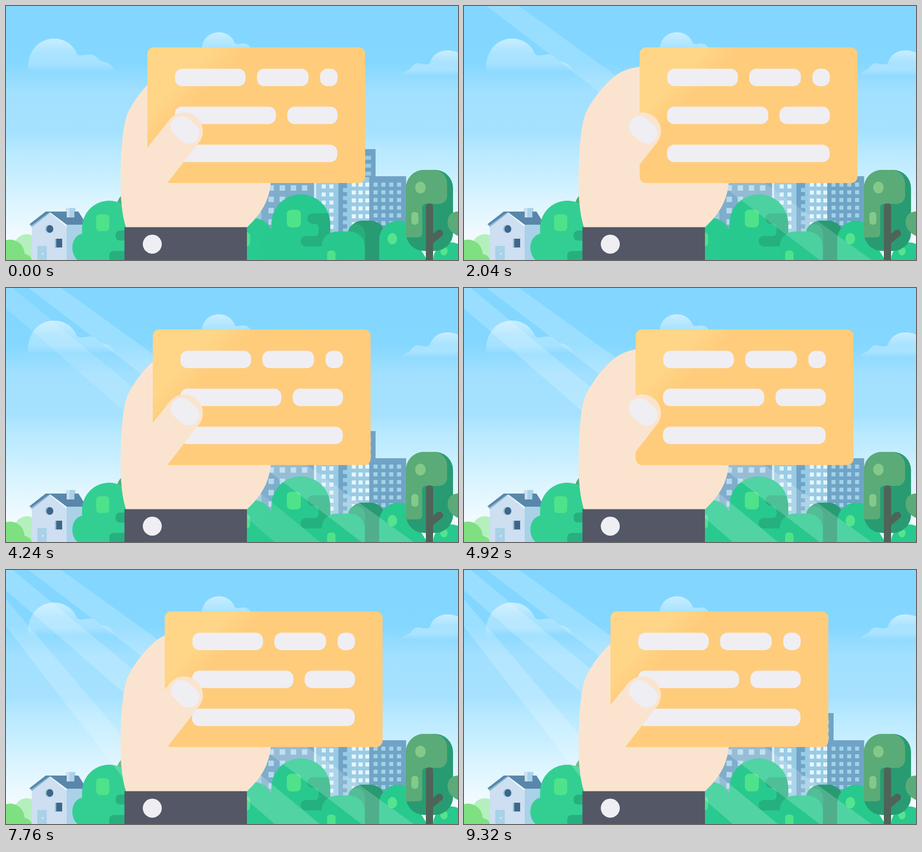
Animation, 998 px wide and 561 px high, one loop 9.56 s. Source, as an HTML page:

```html
<!DOCTYPE html>
<html lang="en">
<head>
<meta charset="utf-8">
<title>Card in hand</title>
<style>
html, body { margin: 0; width: 100%; height: 100%; overflow: hidden; background: #82d6ff; }
svg { display: block; width: 100vw; height: 100vh; }
</style>
</head>
<body>
<svg viewBox="0 0 998 561" preserveAspectRatio="none">
  <defs>
    <linearGradient id="sky" gradientUnits="userSpaceOnUse" x1="0" y1="0" x2="0" y2="561">
      <stop offset="0" stop-color="#82d6ff"/>
      <stop offset=".22" stop-color="#84d7ff"/>
      <stop offset=".34" stop-color="#a2e0ff"/>
      <stop offset=".5" stop-color="#a6e2ff"/>
      <stop offset=".57" stop-color="#b8e9ff"/>
      <stop offset=".66" stop-color="#c6eeff"/>
      <stop offset=".76" stop-color="#daf4ff"/>
      <stop offset=".9" stop-color="#f0faff"/>
    </linearGradient>
    <linearGradient id="mist" x1="0" y1="0" x2="0" y2="1">
      <stop offset="0" stop-color="#fff" stop-opacity=".56"/>
      <stop offset=".45" stop-color="#fff" stop-opacity=".31"/>
      <stop offset=".75" stop-color="#fff" stop-opacity=".27"/>
      <stop offset="1" stop-color="#fff" stop-opacity="0"/>
    </linearGradient>
    <linearGradient id="gold" gradientUnits="userSpaceOnUse" x1="387" y1="167" x2="424" y2="204">
      <stop offset="0" stop-color="#ffd587"/>
      <stop offset="1" stop-color="#ffcc7c"/>
    </linearGradient>
  </defs>

  <rect width="998" height="561" fill="url(#sky)"/>

  <g fill="url(#mist)">
    <path d="M49 146C45 98 74 72 106 72C132 72 150 88 157 106C162 112 174 108 184 107C200 106 203 120 212 122C224 124 236 130 243 146Z"/>
    <path d="M432 110V95C433 73 449 58 470 58C488 58 501 69 505 82C512 87 518 82 526 83C535 84 538 89 541 94V130H432Z"/>
    <path d="M998 154H870C876 147 885 143 893 139C898 130 906 125 914 127C924 130 932 130 936 126C940 109 956 98 974 98C983 98 992 100 998 103Z"/>
  </g>

  <!-- left bushes and house -->
  <circle cx="46" cy="532" r="28" fill="#b5efbe"/>
  <g fill="#7fe082"><circle cx="9" cy="548" r="32"/><ellipse cx="36" cy="562" rx="21" ry="15"/></g>
  <path d="M134 480H176V561H134Z" fill="#a9d1e8"/>
  <path d="M57 485L95 456L134 488V561H57Z" fill="#cddff0"/>
  <path d="M88 454H160L178 483H134L98 456L57 488L52 482Z" fill="#5987ab"/>
  <path d="M52 482L88 454L98 456L57 488Z" fill="#8ebdd7"/>
  <path d="M52 482L88 454H98L57 484Z" fill="#5987ab"/>
  <path d="M132 446H153V454H151V467H134V454H132Z" fill="#a9d1e8"/>
  <path d="M132 446H140V467H134V454H132Z" fill="#cddff0"/>
  <ellipse cx="95" cy="492.500" rx="8.500" ry="9" fill="#93bfd8"/>
  <ellipse cx="97" cy="492.500" rx="7.500" ry="8.500" fill="#3d6789"/>
  <path d="M108 514H124V534H108Z" fill="#93bfd8"/>
  <path d="M111 514H124V533H111Z" fill="#3d6789"/>
  <path d="M69 530H90V561H69Z" fill="#a9d1e8"/>
  <circle cx="81.500" cy="547.500" r="2" fill="#dcebf6"/>

  <!-- left tree -->
  <circle cx="275" cy="441" r="30" fill="#5aa877"/>
  <path d="M168 490A60 60 0 0 1 288 490V561H158C140 546 143 508 168 503Z" fill="#33cf92"/>
  <rect x="199" y="460" width="29" height="37" rx="8" fill="#4ee28b"/>
  <g fill="#27b07f"><rect x="242" y="496" width="50" height="22" rx="9"/><rect x="228" y="541" width="60" height="30" rx="9"/></g>

  <g id="town"></g>

  <!-- right trees -->
  <rect x="755" y="474" width="82" height="110" rx="32" fill="#289b72"/>
  <path d="M755 506C755 490 762 482 772 482C787 482 793 490 793 510V561H755Z" fill="#2aad7d"/>
  <path d="M824 516A42 42 0 0 1 866 474C885 474 900 490 902 516L930 561H824Z" fill="#27c98d"/>
  <ellipse cx="853" cy="514" rx="10.500" ry="12.500" fill="#55e48d"/>
  <circle cx="982" cy="561" r="39" fill="#27c98d"/>
  <ellipse cx="967" cy="541" rx="8" ry="10" fill="#55e48d"/>
  <rect x="883" y="362" width="104" height="179" rx="40" fill="#289b72"/>
  <path d="M883 402A40 40 0 0 1 923 362H944A30 30 0 0 1 974 392V419A18 18 0 0 1 956 437H927A8 8 0 0 0 919 445V503A8 8 0 0 1 911 511H883Z" fill="#5aab77"/>
  <ellipse cx="915" cy="401" rx="11.500" ry="13" fill="#84c98a"/>
  <rect x="895" y="455" width="15.500" height="28" rx="6.500" fill="#84c98a"/>
  <path d="M998 454C984 454 975 463 975 477C975 493 986 502 998 508Z" fill="#5aab77"/>
  <path d="M935 520L957 502" stroke="#4f6459" stroke-width="16" stroke-linecap="round"/>
  <rect x="927" y="436" width="16" height="140" rx="6" fill="#4f6459"/>

  <!-- middle trees -->
  <path d="M500 561V489C520 469 545 462 567 474C578 479 586 490 590 505V561Z" fill="#29ca8f"/>
  <rect x="515" y="500" width="24" height="31" rx="8" fill="#4ee28b"/>
  <path d="M586 481A65 65 0 0 1 716 481V561H573C558 545 558 507 586 497Z" fill="#28c98e"/>
  <rect x="620" y="450" width="31" height="39" rx="9" fill="#4ee28b"/>
  <path d="M712 458H677A11.500 11.500 0 0 0 677 481H682A8 8 0 0 1 690 489V500A8 8 0 0 1 682 508H662A11.500 11.500 0 0 0 662 531H716V481Z" fill="#25b07f"/>
  <path d="M697 561V532C697 510 712 498 734 498H755C778 498 792 511 792 533V561Z" fill="#28c78d"/>
  <rect x="709" y="540" width="18.500" height="40" rx="7" fill="#4ee28b"/>

  <g id="rays" fill="#fff">
    <path d="M50 0H122L900 561H785Z"/>
    <path d="M0 0H15L693 561H593L0 45Z"/>
    <path d="M0 65L300 417V513L0 125Z"/>
  </g>

  <!-- hand and card -->
  <path d="M267 495C252 455 253 400 253 370C254 320 258 260 269 236C285 204 310 172 337 152C355 140 370 137 388 134L430 130L585 385C582 432 562 460 532 489V495Z" fill="#fbe4cf"/>
  <g id="card">
    <rect x="312" y="91.500" width="481" height="299.500" rx="14" fill="url(#gold)"/>
    <g id="pills" fill="#efeef3"></g>
  </g>
  <path d="M361.500 250.600A41 41 0 0 1 426 301.500L356 391V440H270V366Z" fill="#fbe4cf"/>
  <path d="M387.500 266.500L403.500 280.500" stroke="#efeef3" stroke-width="47" stroke-linecap="round"/>
  <rect x="261.500" y="488.500" width="270.500" height="73" fill="#535766"/>
  <circle cx="323" cy="526" r="21" fill="#efeef3"/>
</svg>
<script>
const NS = 'http://www.w3.org/2000/svg';
const $ = id => document.getElementById(id);

function rect(parent, x, y, w, h, fill, r = 0) {
  const el = document.createElementNS(NS, 'rect');
  const attrs = { x, y, width: w, height: h, rx: r };
  for (const k in attrs) el.setAttribute(k, attrs[k]);
  if (fill) el.setAttribute('fill', fill);
  parent.appendChild(el);
}

function panes(x, y, cols, rows, dx, dy, w, h, fill) {
  for (let r = 0; r < rows; r++)
    for (let c = 0; c < cols; c++) rect(town, x + c * dx, y + r * dy, w, h, fill);
}

const town = $('town');
rect(town, 545, 376, 136, 185, '#7fadcc');
panes(579.5, 396, 4, 4, 24.6, 25, 12, 12, '#b4d9ec');
rect(town, 545, 455, 19, 106, '#9bc8e0');
rect(town, 680, 376, 5, 185, '#d3eaf6');
rect(town, 685, 376, 50, 185, '#9acbe4');
panes(697, 394, 2, 6, 17, 17.8, 9, 9, '#e0f3fc');
rect(town, 734, 376, 19, 185, '#6fa4c6');
panes(744, 402, 1, 6, 0, 17.8, 9, 9, '#9acbe4');
rect(town, 753, 376, 50, 185, '#9acbe4');
panes(763.5, 390, 3, 6, 15, 17.5, 9, 9, '#e8f6fd');
rect(town, 775, 316, 41, 62, '#6fa4c6');
panes(793, 331, 1, 3, 0, 17.5, 13, 8.5, '#9acbe4');
rect(town, 802, 376, 81.5, 185, '#6fa4c6');
panes(811.5, 390, 4, 6, 17.3, 17, 9, 9, '#a4d1e8');

const pills = [[373, 138.5, 156], [554, 138.5, 114], [693.5, 138.5, 38.5],
  [372.5, 222.3, 223.5], [621, 222.3, 111], [372.5, 306.3, 359]];
for (const [x, y, w] of pills) rect($('pills'), x, y, w, 38.5, null, 16);

const LOOP = 9560, STOP = 9320, STEP = 40;
const PULL = { period: 3200, start: 360, peak: 2360, reach: 77 };
const RAY = { starts: [360, 2900, 5900], fade: 2000, alpha: .19 };

const clamp = v => Math.max(0, Math.min(1, v));
const ease = u => u < .5 ? 4 * u ** 3 : 1 - 4 * (1 - u) ** 3;

function cardShift(t) {
  const p = t % PULL.period;
  if (p < PULL.peak) return PULL.reach * ease(clamp((p - PULL.start) / (PULL.peak - PULL.start)));
  return PULL.reach * (1 - ease((p - PULL.peak) / (PULL.period - PULL.peak)));
}

const card = $('card'), rays = [...$('rays').children];

function draw(ms) {
  const t = Math.min(Math.floor(ms % LOOP / STEP) * STEP, STOP);
  card.setAttribute('transform', `translate(${cardShift(t).toFixed(2)} 0)`);
  rays.forEach((ray, i) => {
    ray.setAttribute('opacity', RAY.alpha * clamp((t - RAY.starts[i]) / RAY.fade));
  });
}

let origin = null;
function tick(now) {
  if (origin === null) origin = now;
  draw(now - origin);
  requestAnimationFrame(tick);
}
draw(0);
requestAnimationFrame(tick);
</script>
</body>
</html>
```
